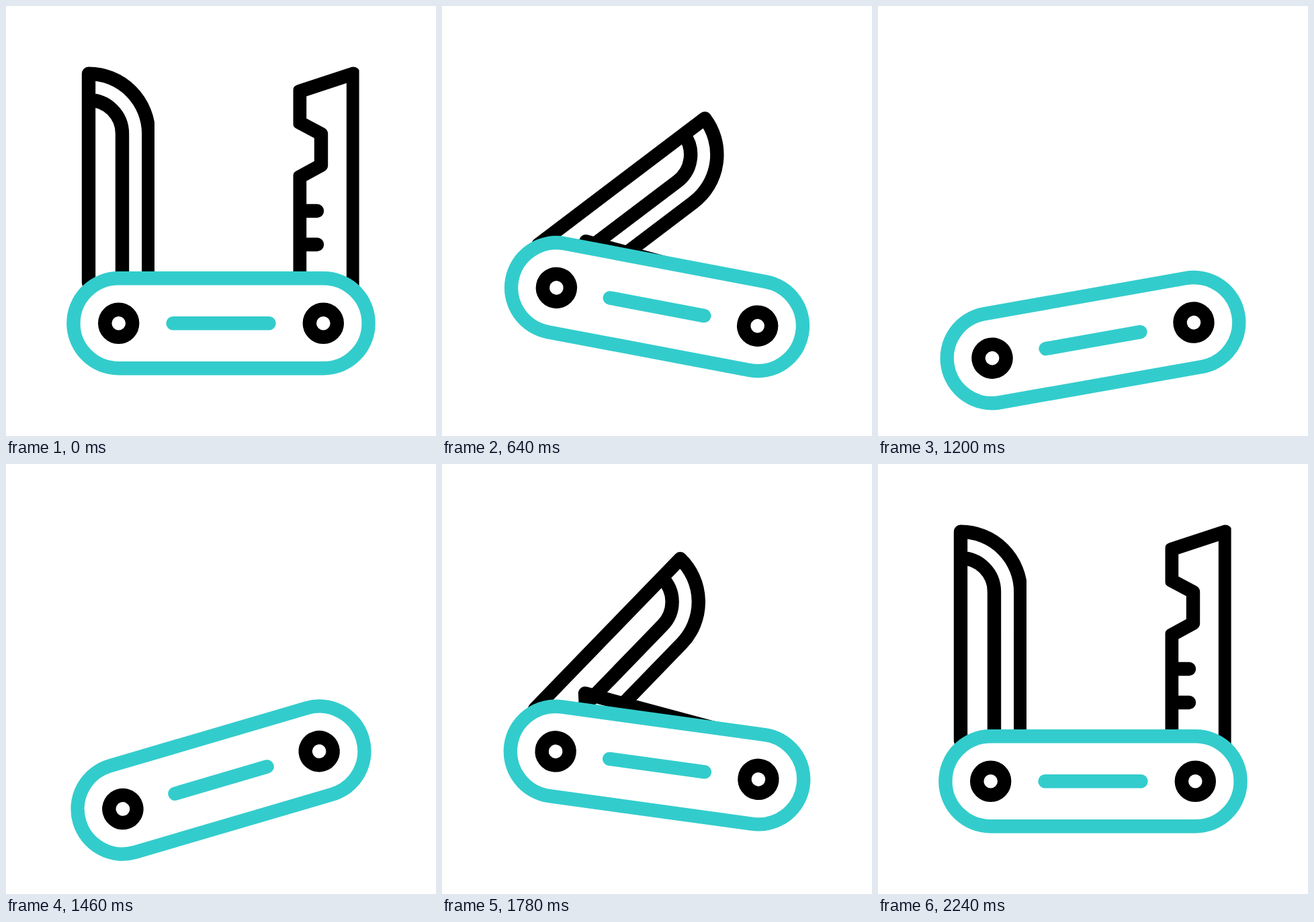
An HTML page for the animation above (2400 ms loop, 640x640 px).

```html
<!DOCTYPE html>
<html lang="en">
<head>
<meta charset="utf-8">
<title>Pocket knife</title>
<style>
  html, body { margin: 0; width: 100%; height: 100%; overflow: hidden; background: #fff; }
  svg { display: block; width: 100%; height: 100%; }
</style>
</head>
<body>
<svg viewBox="0 0 640 640" fill="none" stroke="#000" stroke-width="20.4" stroke-linecap="round" stroke-linejoin="round">
  <clipPath id="trim"><path d="M0 0H221V640H0ZM427.5 0H525.6V640H427.5Z"/></clipPath>
  <g id="knife">
    <g id="blades">
      <path id="left" d="M123 412V100.8A89.3 89.3 0 0 1 212.3 190V405M123 140A50 50 0 0 1 173 190V405"/>
      <path id="right" d="M517 412V100.8L437 127V173.5L469 190.5V237L437 254.5V405M437 305H463M437 355H463"/>
    </g>
    <g stroke="#3cc">
      <rect x="100.4" y="405.2" width="439.2" height="134" rx="67" fill="#fff"/>
      <path d="M248.5 472.2H391.5"/>
    </g>
    <circle cx="167.7" cy="472.2" r="20.5"/>
    <circle cx="472.3" cy="472.2" r="20.5"/>
  </g>
</svg>
<script>
  const LOOP = 2400, HALF = LOOP / 2, REST = 200;
  const CLOSED = 89, BOB = 25.4;
  const set = (id, name, value) => document.getElementById(id).setAttribute(name, value);

  // Smooth step from 0 to 1 that begins at start.
  function ease(t, start, duration = 500) {
    const s = Math.min(1, Math.max(0, (t - start) / duration));
    return s * s * (3 - 2 * s);
  }

  function draw() {
    const t = performance.now() % LOOP;
    const mirrored = HALF - Math.abs(t - HALF); // opening is closing run backwards
    const lift = BOB * (2 * ease(mirrored, 700) - ease(mirrored, REST));
    const tilt = 13 * ease(t, REST, 600) - 31 * ease(t, 800, 600)
               + 26 * ease(t, 1400, 400) - 8 * ease(t, 1800, 400);

    set('knife', 'transform', `translate(0 ${lift}) rotate(${tilt} 320 472.2)`);
    set('left', 'transform', `rotate(${CLOSED * ease(mirrored, 400)} 123 421)`);
    set('right', 'transform', `rotate(${-CLOSED * ease(mirrored, REST)} 517 421)`);
    // The open blades have trimmed sides while the knife rests.
    set('blades', 'clip-path', mirrored <= REST ? 'url(#trim)' : 'none');
    requestAnimationFrame(draw);
  }
  draw();
</script>
</body>
</html>
```
